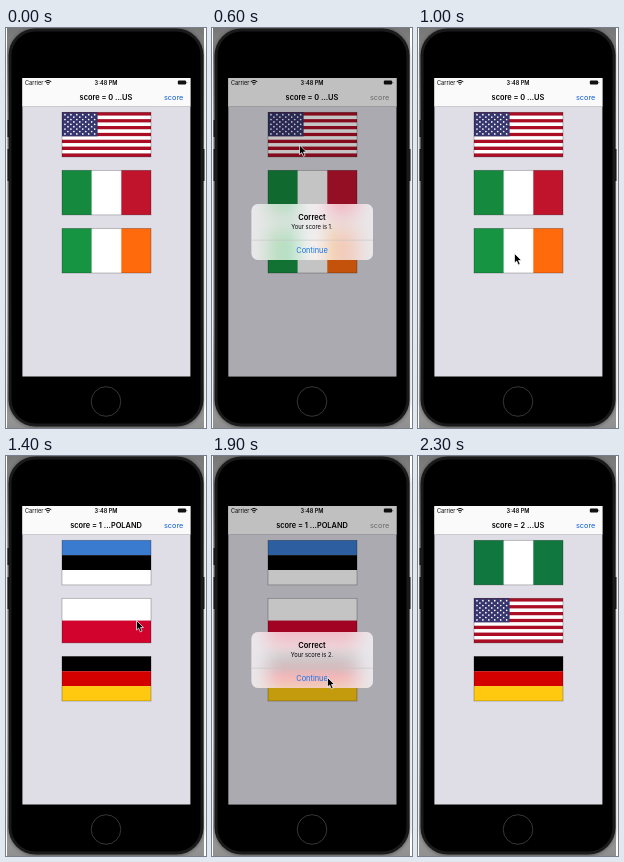
These frames come from a looping animation (200x400 px, 2400 ms). An HTML page:

```html
<!DOCTYPE html>
<html lang="en">
<head>
<meta charset="utf-8">
<title>Guess the flag</title>
<style>
  html, body { margin: 0; width: 100%; height: 100%; overflow: hidden; background: #fff; }
  svg { display: block; width: 200px; height: 400px; }
  text { font-family: Inter, "Liberation Sans", sans-serif; }
  .bold { font-weight: 600; }
  .mid { text-anchor: middle; }
</style>
</head>
<body>
<svg viewBox="0 0 200 400">
  <defs>
    <linearGradient id="backdrop" x2="0" y2="1">
      <stop offset="0" stop-color="#777"/>
      <stop offset=".3" stop-color="#c4c4c4"/>
      <stop offset=".7" stop-color="#c4c4c4"/>
      <stop offset="1" stop-color="#909090"/>
    </linearGradient>
    <filter id="shadow" x="-10%" y="-10%" width="120%" height="120%"><feGaussianBlur stdDeviation="2"/></filter>
    <filter id="blur" x="-30%" y="-30%" width="160%" height="160%" color-interpolation-filters="sRGB">
      <feGaussianBlur stdDeviation="9"/>
      <feColorMatrix type="saturate" values="1.8"/>
    </filter>
    <clipPath id="panel"><rect x="39.5" y="176" width="121.5" height="56" rx="6.5"/></clipPath>
    <clipPath id="screen"><rect x="16.4" y="50" width="168" height="298.5"/></clipPath>
  </defs>

  <rect x="1" width="197" height="400" fill="url(#backdrop)"/>
  <rect x="3" y="1" width="194" height="398" rx="27" fill="#000" opacity=".5" filter="url(#shadow)"/>
  <path d="M1.5 92h3v17h-3zM1.5 121h3v32h-3zM195.5 121h3v32h-3z" fill="#161617"/>
  <rect x="2.5" y=".5" width="195" height="398" rx="27" fill="#1a1a1b"/>
  <rect x="5.5" y="3.5" width="189" height="392" rx="24"/>
  <circle cx="100" cy="373.5" r="14.8" fill="none" stroke="#444" stroke-width=".8"/>

  <g clip-path="url(#screen)">
    <rect x="16" y="50" width="169" height="299" fill="#dfdde6"/>
    <rect x="16" y="50" width="169" height="28.5" fill="#fafafa"/>
    <rect x="16" y="78.3" width="169" height=".6" fill="#b5b5b8"/>
    <text x="19" y="56.8" font-size="5.6">Carrier</text>
    <g fill="none" stroke="#111" stroke-width="1">
      <path d="M38.7 53.7q3.3-2.8 6.6 0M40 55q2-1.6 4 0"/>
      <circle cx="42" cy="56.2" r=".35"/>
    </g>
    <text class="bold mid" x="100" y="56.8" font-size="5.6">3:48 PM</text>
    <rect x="171.8" y="52.6" width="8.3" height="3.9" rx="1.1" fill="#111"/>
    <rect x="180.5" y="53.8" width=".7" height="1.5" rx=".3" fill="#444"/>
    <text id="title" class="bold mid" x="100" y="72" font-size="7.4"></text>
    <text id="link" x="158" y="72" font-size="7.3">score</text>
    <g id="flags"></g>

    <g id="alert">
      <rect x="16" y="50" width="169" height="299" opacity=".23"/>
      <g clip-path="url(#panel)">
        <rect x="39" y="175" width="123" height="58" fill="#d6d5da"/>
        <use href="#flags" filter="url(#blur)"/>
        <rect x="39" y="175" width="123" height="58" fill="#f0edf0" opacity=".77"/>
        <rect x="39" y="211.8" width="123" height=".6" fill="#c4c0c4"/>
      </g>
      <text class="bold mid" x="100" y="192" font-size="7.5">Correct</text>
      <text id="message" class="mid" x="100" y="201" font-size="5.8"></text>
      <text class="mid" x="100" y="224.6" font-size="7.4" fill="#1673e6">Continue</text>
    </g>
    <path id="cursor" d="M0 0V9.6L2.2 7.6L3.8 11.4L5.6 10.6L4 7H7Z" fill="#000" stroke="#fff" stroke-width=".7"/>
  </g>
</svg>
<script>
const LOOP = 2400, STEP = 100;
const FLAG = { x: 56, w: 89, h: 44.6, tops: [84.3, 142.3, 200.4] };
const $ = id => document.getElementById(id);

const rect = (x, y, w, h, fill) =>
  `<rect x="${x}" y="${y}" width="${w}" height="${h}" fill="${fill}"/>`;

const columns = (...colors) => colors.map((c, i) =>
  rect(i * FLAG.w / 3, 0, FLAG.w / 3 + (i < 2 ? .2 : 0), FLAG.h, c)).join("");

const rows = (...colors) => colors.map((c, i) =>
  rect(0, i * FLAG.h / colors.length, FLAG.w, FLAG.h / colors.length, c)).join("");

function starsAndStripes() {
  const stripe = FLAG.h / 13, cantonW = 35.6, cantonH = stripe * 7;
  let out = rows(...Array.from({ length: 13 }, (_, i) => i % 2 ? "#fff" : "#ab0d24"));
  out += rect(0, 0, cantonW, cantonH, "#36356d");
  for (let row = 1; row <= 9; row++)
    for (let col = 1; col <= 11; col++)
      if ((row + col) % 2 === 0)
        out += `<circle cx="${col * cantonW / 12}" cy="${row * cantonH / 10}" r=".85" fill="#fff"/>`;
  return out;
}

const art = {
  us: starsAndStripes(),
  italy: columns("#158a3e", "#fff", "#c0142d"),
  ireland: columns("#169442", "#fff", "#ff6a0d"),
  nigeria: columns("#10783e", "#fff", "#10783e"),
  estonia: rows("#3a7bd0", "#000", "#fff"),
  poland: rows("#fff", "#d2042d"),
  germany: rows("#000", "#d40000", "#ffc90f")
};

const rounds = [
  { start: 0, answer: "US", flags: ["us", "italy", "ireland"], alert: [600, 1000] },
  { start: 1100, answer: "POLAND", flags: ["estonia", "poland", "germany"], alert: [1600, 2000] },
  { start: 2100, answer: "US", flags: ["nigeria", "us", "germany"], alert: [LOOP, LOOP] }
];

// Pointer stops: time, x, y
const path = [
  [200, 112, 170], [400, 87.5, 117], [700, 87.5, 117], [900, 96.5, 225.5],
  [1100, 96.5, 225.5], [1400, 130.5, 164.5], [1600, 130.5, 164.5],
  [1900, 115.5, 221.5], [2100, 115.5, 221.5]
];

function pointerAt(t) {
  if (t < path[0][0] || t > path.at(-1)[0]) return null;
  const i = Math.max(1, path.findIndex(p => p[0] >= t));
  const [t0, x0, y0] = path[i - 1], [t1, x1, y1] = path[i];
  const u = (t - t0) / (t1 - t0), k = u * u * (3 - 2 * u);
  return [x0 + (x1 - x0) * k, y0 + (y1 - y0) * k];
}

const drawFlags = names => names.map((name, i) =>
  `<g transform="translate(${FLAG.x} ${FLAG.tops[i]})">${art[name]}
   <rect width="${FLAG.w}" height="${FLAG.h}" fill="none" stroke="#000" stroke-opacity=".35" stroke-width=".7"/></g>`).join("");

let shownRound = -1;

function render(t) {
  const index = rounds.findLastIndex(r => t >= r.start);
  const round = rounds[index];
  if (index !== shownRound) {
    shownRound = index;
    $("title").textContent = `score = ${index} ...${round.answer}`;
    $("message").textContent = `Your score is ${index + 1}.`;
    $("flags").innerHTML = drawFlags(round.flags);
  }
  const alerting = t >= round.alert[0] && t < round.alert[1];
  $("alert").style.display = alerting ? "" : "none";
  $("link").setAttribute("fill", alerting ? "#8a8a8e" : "#145fe0");

  const pointer = pointerAt(t);
  $("cursor").style.display = pointer ? "" : "none";
  if (pointer) $("cursor").setAttribute("transform", `translate(${pointer})`);
}

const origin = performance.now();
function tick() {
  const t = (performance.now() - origin) % LOOP;
  render(Math.floor(t / STEP) * STEP);
  requestAnimationFrame(tick);
}
render(0);
requestAnimationFrame(tick);
</script>
</body>
</html>
```
